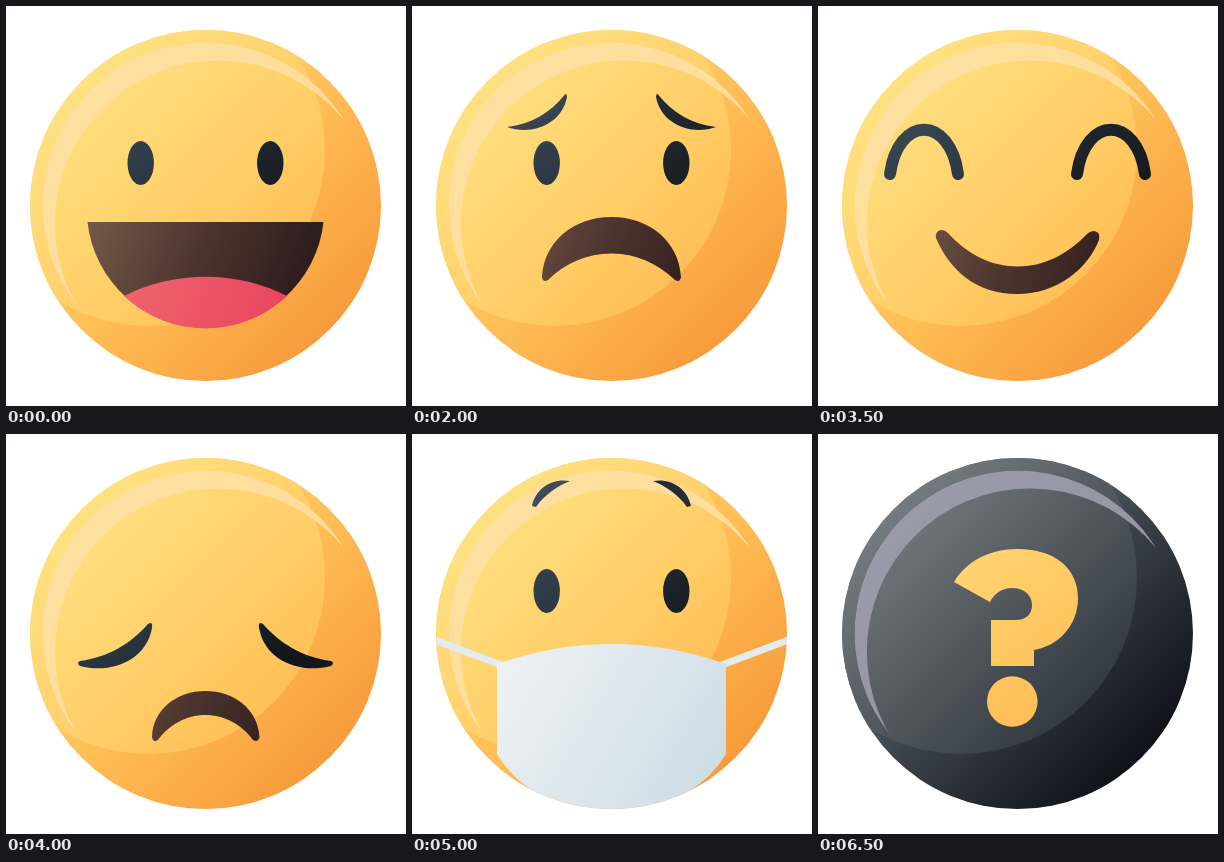
An HTML page for the animation above (8000 ms loop, 400 by 400 pixels).

```html
<!DOCTYPE html>
<html lang="en">
<head>
<meta charset="utf-8">
<title>Faces</title>
<style>
  html, body { margin: 0; width: 100%; height: 100%; overflow: hidden; background: #fff; }
  svg { display: block; width: 100%; height: 100%; }
</style>
</head>
<body>
<svg id="stage" viewBox="0 0 400 400"></svg>
<script>
const gradient = (id, [x1, y1, x2, y2], colors) =>
  `<linearGradient id="${id}" gradientUnits="userSpaceOnUse" x1="${x1}" y1="${y1}" x2="${x2}" y2="${y2}">` +
  colors.map((c, i) => `<stop offset="${i / (colors.length - 1)}" stop-color="${c}"/>`).join('') +
  '</linearGradient>';
const path = (d, fill, extra = '') => `<path d="${d}" fill="${fill}" ${extra}/>`;
const line = (d, stroke, width, extra = '') => path(d, 'none', `stroke="${stroke}" stroke-width="${width}" ${extra}`);
const circle = (x, y, r, fill, extra = '') => `<circle cx="${x}" cy="${y}" r="${r}" fill="${fill}" ${extra}/>`;
const ellipse = (x, y, rx, ry, fill) => `<ellipse cx="${x}" cy="${y}" rx="${rx}" ry="${ry}" fill="${fill}"/>`;
const move = (y, art) => `<g transform="translate(0 ${y})">${art}</g>`;

// Draws a left part and its mirror image, each in its own colour.
const pair = (draw, left = 'url(#inkLeft)', right = 'url(#inkRight)') =>
  draw(left) + `<g transform="matrix(-1 0 0 1 399 0)">${draw(right)}</g>`;

const themes = {
  yellow: { base: ['#ffdf7e', '#ffbf57', '#f79b3b'], disc: ['#ffe182', '#ffcd66', '#ffb44d'], shine: '#fee0a3' },
  green: { base: ['#9fc728', '#1ea33c', '#009a3f'], disc: ['#92c22d', '#5dac36', '#009f40'], shine: '#98c422' },
  red: { base: ['#f0687b', '#ea4b56', '#e52b33'], disc: ['#ee6472', '#ea4e5b', '#e7353f'], shine: '#f1768c' },
  gray: { base: ['#81898f', '#3b434b', '#0f1119'], disc: ['#737b80', '#495157', '#20272f'], shine: '#9f9fad' }
};

const diagonal = [75, 75, 325, 325];
const sharedDefs =
  gradient('inkLeft', [95, 95, 165, 205], ['#3c4b57', '#25303a']) +
  gradient('inkRight', [165, 95, 95, 205], ['#242d35', '#13171b']) +
  gradient('brown', [85, 215, 295, 300], ['#745747', '#4c342e', '#2b1b1b']) +
  gradient('tongue', [130, 270, 270, 320], ['#ee636c', '#ea4560']) +
  gradient('gold', [150, 130, 250, 270], ['#ffd36e', '#ffbd55']) +
  gradient('lens', [60, 110, 340, 200], ['#3c4b57', '#13171b']) +
  gradient('cloth', [60, 200, 340, 370], ['#f2f6f8', '#c9d8e2']) +
  '<clipPath id="faceClip"><circle cx="199.5" cy="199.5" r="175.5"/></clipPath>' +
  `<mask id="crescent">${circle(199.5, 199.5, 163, '#fff')}${circle(212, 217.6, 163.2, '#000')}</mask>`;

const head = ({ base, disc, shine }) =>
  `<defs>${sharedDefs}${gradient('base', diagonal, base)}${gradient('disc', diagonal, disc)}</defs>` +
  circle(199.5, 199.5, 175.5, 'url(#base)') +
  circle(143, 144, 176, 'url(#disc)', 'clip-path="url(#faceClip)"') +
  circle(199.5, 199.5, 163, shine, 'mask="url(#crescent)" opacity=".9"');

// Eyes and brows
const eyes = y => pair(c => ellipse(134.7, y, 13.2, 22, c));
const sadEyes = pair(c => path('M74 227C103 223 124 210 142 190Q147 187 146 194C140 227 105 240 74 232Q70 229 74 227Z', c));
const crossEyes = pair(c => line('M92.4 139.4l49.2 49.2M141.6 139.4l-49.2 49.2', c, 18));
const closedEyes = pair(c => line('M99 151Q135 190 166 151', c, 9, 'stroke-linecap="round"'));
const happyEyes = pair(c => line('M72 168C80 109 132 109 140 168', c, 12, 'stroke-linecap="round"'));
const worriedBrows = pair(c => path('M95 121C120 118 138 107 153 88.5Q155 87 155 91C150 118 120 130 95 121Z', c));
const raisedBrows = pair(c => path('M120 76C124 58 140 48 158 51C146 56 133 64 124 77Z', c));
const angryBrows = pair(c => line('M126 111L165.5 151.5', c, 15));
const horns = pair(
  c => path('M25.5 34Q28 24 36 24Q41 24 44 29C54 45 67 59 84 69L41 128C30 108 24 70 25.5 34Z', c),
  'url(#base)', '#ea4b56');

// Mouths
const brown = 'url(#brown)';
const laugh = path('M81.5 216H317.5A118.7 118.7 0 0 1 81.5 216Z', brown) +
  path('M118 290A182 182 0 0 1 281 290A118.7 118.7 0 0 1 118 290Z', 'url(#tongue)');
const smile = path('M118 232Q117 224 124 224Q127 224 130 227C150 249 174 260.5 199.5 260.5S249 249 269 228Q272 225 276 225Q283 226 281 234C270 262 240 288 199.5 288S132 265 118 232Z', brown);
const frown = path('M130 271C132 235 162 211 199.5 211S267 235 269 271Q268 277 263 274C245 257 224 247.5 199.5 247.5S153 257 136 274Q131 277 130 271Z', brown);
const smallFrown = path('M146 303C147 275 171 257 199.5 257S252 275 253.5 303Q252 309 247 306C236 291 219 281 199.5 281S163 291 152 306Q147 309 146 303Z', brown);
const wave = line('M97.5 253C103 240 110 235 120 235C140 235 140 260 160 260S180 235 200 235S220 260 240 260S260 235 280 235C290 235 296 240 301 253', brown, 15, 'stroke-linecap="round"');
const gasp = ellipse(199.5, 263, 34, 40, brown);

// Accessories
const sunglasses = path('M40 128Q120 108 199.5 128Q280 108 360 128L357 142L338 146C336 186 306 198 276 196C240 194 222 174 217 148Q199.5 138 182 148C177 174 159 194 123 196C93 198 63 186 61 146L43 142Z', 'url(#lens)');
const faceMask = `<g clip-path="url(#faceClip)">${
  line('M20 205L100 235M379 205L299 235', '#e4ecf0', 7)}${
  path('M85 230Q199.5 190 314 230V320Q280 376 199.5 376Q119 376 85 320Z', 'url(#cloth)')}</g>`;
const question = path('M136 148C148 128 170 115 200 115C236 115 260 134 260 164C260 192 240 212 216 216V232H173V186H198C208 186 214 180 214 171C214 161 206 154 194 154C184 154 176 160 172 168Z', 'url(#gold)') +
  circle(194.3, 267.5, 25.3, 'url(#gold)');

const { yellow, green, red, gray } = themes;
const scenes = [
  [0, head(yellow) + eyes(157) + laugh],
  [500, head(yellow) + raisedBrows + closedEyes + smile],
  [1000, head(yellow) + raisedBrows + eyes(157) + gasp],
  [1500, head(yellow) + eyes(157) + move(5, frown)],
  [2000, head(yellow) + worriedBrows + eyes(157) + frown],
  [2500, head(yellow) + raisedBrows + sunglasses + smile],
  [3000, head(green) + crossEyes + wave],
  [3500, head(yellow) + happyEyes + smile],
  [4000, head(yellow) + sadEyes + smallFrown],
  [4500, horns + head(red) + angryBrows + eyes(178) + smile],
  [5000, head(yellow) + move(-4, raisedBrows) + eyes(157) + faceMask],
  [5500, head(yellow) + eyes(168) + smile],
  [6500, head(gray) + question]
];

const loop = 8000;
const stage = document.getElementById('stage');
const start = performance.now();
let shown = null;

function render(now) {
  const time = Math.max(0, now - start) % loop;
  const scene = scenes.findLast(([from]) => from <= time);
  if (scene !== shown) {
    shown = scene;
    stage.innerHTML = scene[1];
  }
  requestAnimationFrame(render);
}
render(start);
</script>
</body>
</html>
```
